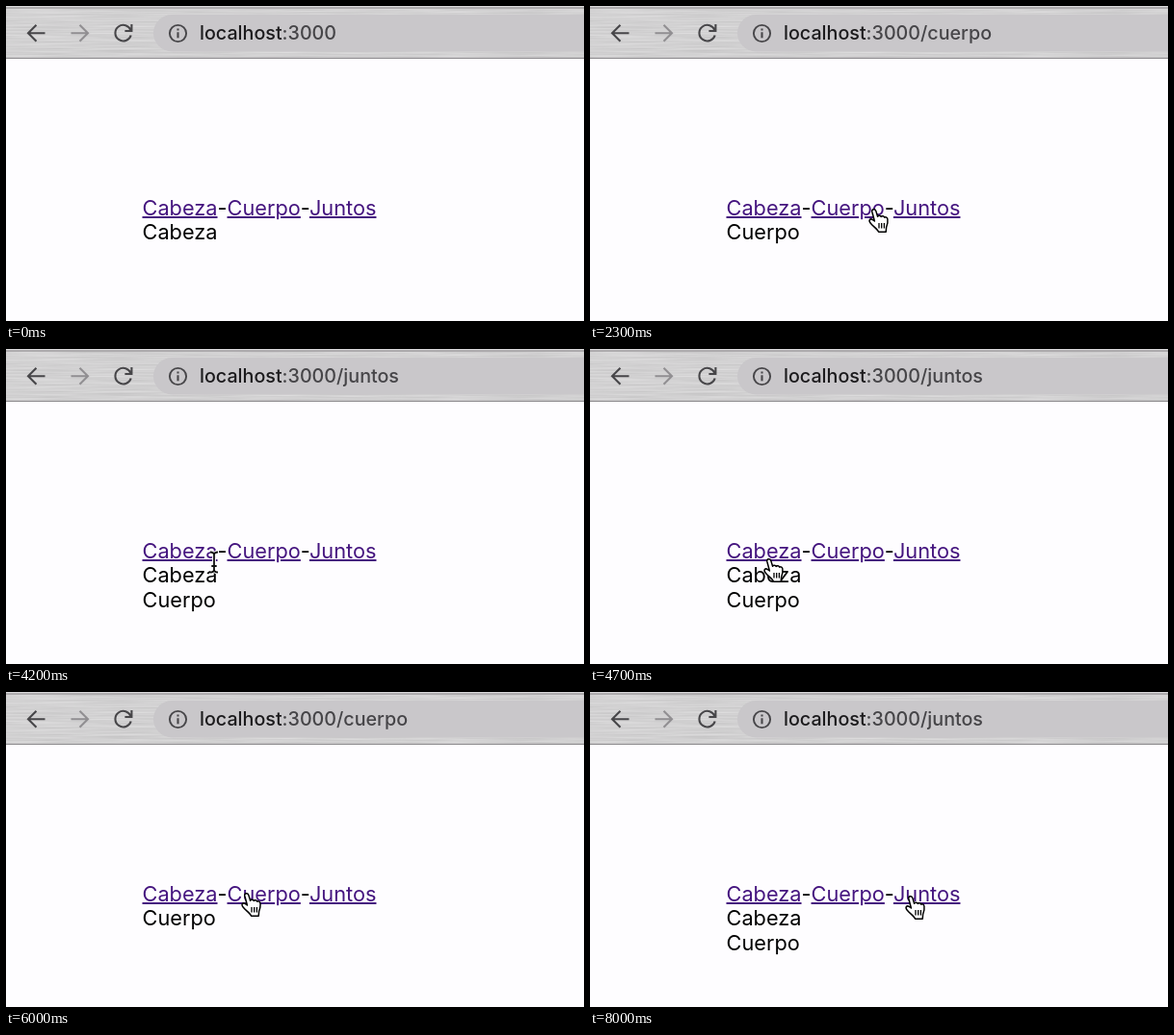
Animation, 600 px wide and 328 px high, one loop 8.7 s. Source, as an HTML page:

```html
<!DOCTYPE html>
<html lang="es">
<head>
<meta charset="utf-8">
<title>Rutas</title>
<style>
  html, body { margin: 0; width: 100%; height: 100%; overflow: hidden; background: #fefdff; }
  body { position: relative; font-family: Inter, "Noto Sans", sans-serif; font-optical-sizing: none; }
  svg { position: absolute; left: 0; top: 0; }
  #url, #page { position: absolute; white-space: pre; }
  #url { left: 201px; top: 16px; font-size: 19.7px; font-weight: 450; line-height: 24px; color: #464548; }
  #url b { font-weight: 450; color: #1c1b1d; }
  #page { left: 141.5px; top: 197.5px; font-size: 21.75px; line-height: 25.5px; color: #000; }
  #page u { color: #45157f; text-decoration-thickness: 1.5px; text-underline-offset: 1.3px; }
</style>
</head>
<body>
<svg width="600" height="328" viewBox="0 0 600 328" fill="none">
  <filter id="brushed" x="0" y="0" width="1" height="1" color-interpolation-filters="sRGB">
    <feTurbulence type="fractalNoise" baseFrequency=".012 .6" numOctaves="3" seed="7"/>
    <feColorMatrix values=".13 0 0 0 .76  .13 0 0 0 .757  .13 0 0 0 .76  0 0 0 0 1"/>
  </filter>
  <rect width="600" height="54" filter="url(#brushed)"/>
  <path d="M0 .5H600" stroke="#dddcde"/>
  <path d="M0 2H600" stroke="#a09ea1" stroke-width="1.3"/>
  <path d="M0 54.3H600" stroke="#939194" stroke-width="1.3"/>
  <rect x="153" y="9" width="480" height="38.5" rx="19.25" fill="#c9c7ca"/>
  <g stroke="#474649" stroke-width="2.1">
    <path d="M40.5 28.3H23.5M31.5 19.8L23 28.3L31.5 36.8"/>
    <path d="M67.5 28.3H84.5M76.5 19.8L85 28.3L76.5 36.8" stroke="#918f92"/>
    <path d="M129.6 25.5A8.3 8.3 0 1 0 129.7 30.5M130.4 19V26H123.4"/>
    <circle cx="178.5" cy="28.5" r="8.6" stroke-width="1.9"/>
    <path d="M178.5 27.2V33.3M178.5 23.5V25.5"/>
  </g>
</svg>

<div id="url"><b>localhost</b>:3000<span id="path"></span></div>
<div id="page"><u>Cabeza</u>-<u>Cuerpo</u>-<u>Juntos</u>
<span id="content"></span></div>

<svg width="600" height="328" viewBox="0 0 600 328" fill="none" stroke-linejoin="round">
  <g id="cursor">
    <path id="arrow" d="M0 0V20L4.7 15.6L8 23L11.4 21.6L8.2 14.3H14.5Z"
      fill="#000" stroke="#fff" stroke-width="1.5"/>
    <g id="hand" transform="translate(0 1)" stroke="#000" stroke-width="1.5">
      <path fill="#fff" d="M-2.2 2.2C-2.8 -.6 .9 -1.2 1.8 1.4L3.6 7.2C4.4 5.9 6.6 6 7.2 7.4
        C8.2 6.3 10.2 6.7 10.8 8.2C12 7.3 13.7 8.2 13.9 10C14.4 13 13.6 16 12.6 18.6L12.2 23.3H4.6
        C3.6 20.6 -.6 18 -3.9 14C-6.3 11 -4 9 -1.8 10.4L.4 12Z"/>
      <path d="M5 14V19.5M7.7 14V19.5M10.4 14V19.5" stroke-width="1.3"/>
    </g>
    <g id="beam">
      <path id="halo" d="M-4 -10.5Q0 -10.5 0 -7.5V7.5Q0 10.5 -4 10.5
        M4 -10.5Q0 -10.5 0 -7.5M4 10.5Q0 10.5 0 7.5M-2.7 4H2.7" stroke="#fff" stroke-width="3.8"/>
    </g>
  </g>
</svg>

<script>
const LOOP = 8700, STEP = 100;
const $ = id => document.getElementById(id);

// A thinner dark copy of the text cursor lies on its white halo.
const ink = $('halo').cloneNode();
ink.removeAttribute('id');
ink.setAttribute('stroke', '#111');
ink.setAttribute('stroke-width', 1.8);
$('beam').append(ink);

const routes = {
  cabeza: ['', 'Cabeza'],
  cuerpo: ['/cuerpo', 'Cuerpo'],
  juntos: ['/juntos', 'Cabeza\nCuerpo']
};

const visits = [
  [0, 'cabeza'], [1200, 'cuerpo'], [2800, 'juntos'],
  [4800, 'cabeza'], [5900, 'cuerpo'], [7300, 'juntos']
];

// time, x, y, cursor shape from that time on
const track = [
  [100, 498, 314, 'arrow'], [300, 405, 270, 'arrow'], [500, 320, 238, 'arrow'],
  [700, 282, 219, 'hand'], [900, 271, 213, 'hand'],
  [2200, 271, 213, 'hand'], [2300, 295, 211, 'hand'], [2400, 317, 208, 'hand'], [2500, 328, 207, 'hand'],
  [3800, 328, 207, 'hand'], [3900, 319, 197, 'arrow'], [4000, 285, 177, 'arrow'],
  [4100, 246, 193, 'arrow'], [4200, 216, 222, 'beam'], [4300, 194, 241, 'beam'],
  [4400, 184, 244, 'beam'], [4500, 184, 231, 'beam'], [4600, 185, 221, 'hand'], [4700, 186, 218, 'hand'],
  [5100, 186, 218, 'hand'], [5200, 188, 219, 'hand'], [5400, 222, 213, 'hand'], [5700, 250, 209, 'hand'],
  [6300, 250, 209, 'hand'], [6500, 283, 208, 'hand'], [6700, 319, 209, 'hand'], [7100, 333, 212, 'hand']
];

const lastBefore = (list, t) => list.findLastIndex(item => item[0] <= t);

function drawCursor(t) {
  const i = lastBefore(track, t);
  $('cursor').style.display = i < 0 ? 'none' : '';
  if (i < 0) return;
  const [t0, x0, y0, shape] = track[i];
  const [t1, x1, y1] = track[i + 1] || [LOOP, x0, y0];
  const k = (t - t0) / (t1 - t0);
  $('cursor').setAttribute('transform', `translate(${x0 + (x1 - x0) * k} ${y0 + (y1 - y0) * k})`);
  for (const id of ['arrow', 'hand', 'beam']) $(id).style.display = id === shape ? '' : 'none';
}

function draw() {
  const t = Math.floor(performance.now() % LOOP / STEP) * STEP;
  const [path, content] = routes[visits[lastBefore(visits, t)][1]];
  $('path').textContent = path;
  $('content').textContent = content;
  drawCursor(t);
  requestAnimationFrame(draw);
}
draw();
</script>
</body>
</html>
```
